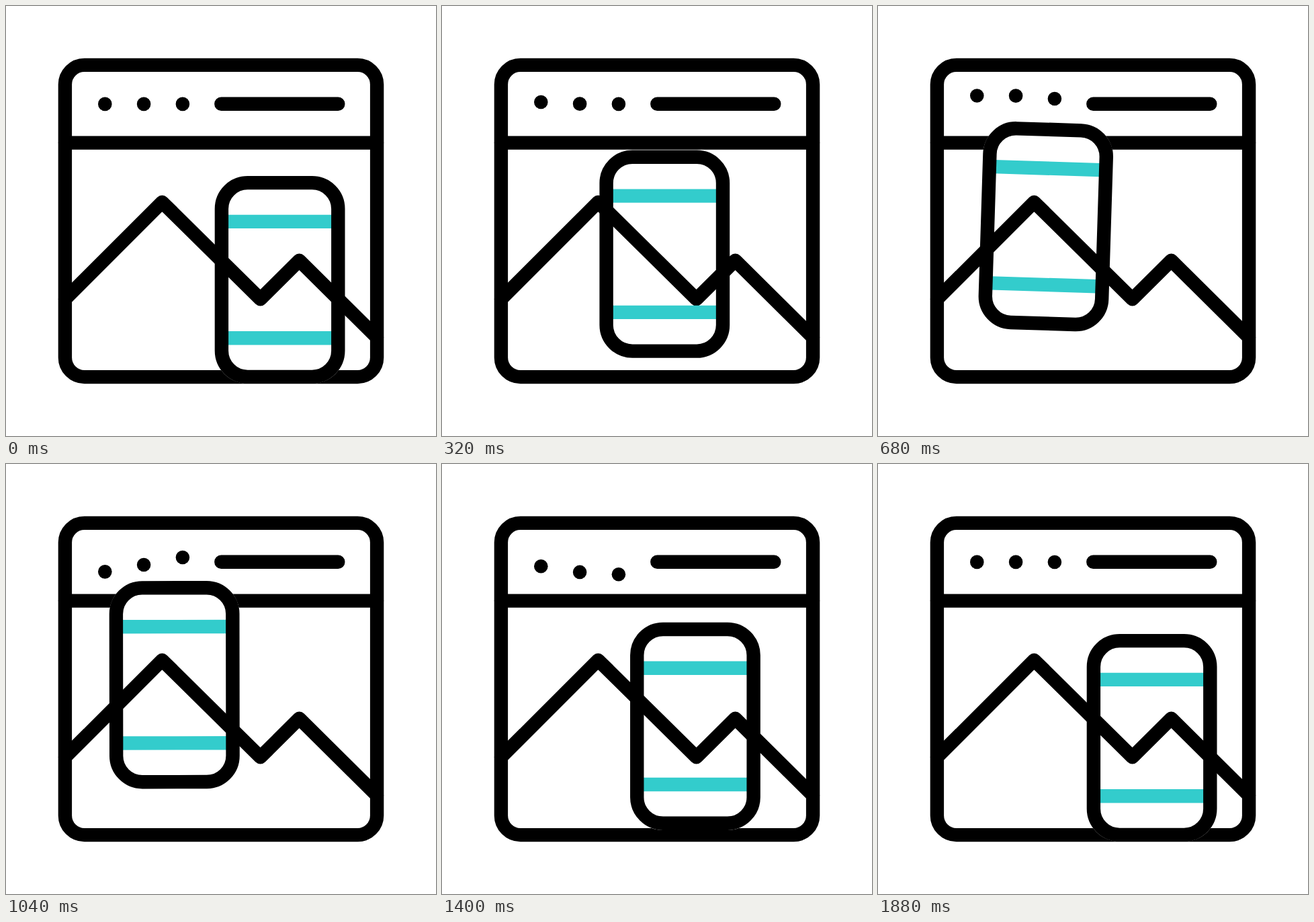
Write an HTML page that moves like this. It is 640 by 640 pixels and loops after 1.92 s.

```html
<!DOCTYPE html>
<html lang="en">
<head>
<meta charset="utf-8">
<title>Responsive window</title>
<style>
  html, body { margin: 0; width: 100%; height: 100%; overflow: hidden; background: #fff; }
  svg { display: block; width: 100%; height: 100%; }
  .line { fill: none; stroke: #000; stroke-width: 20.4; stroke-linecap: round; stroke-linejoin: round; }
  .stripe { stroke: #33cccc; stroke-width: 20.4; }
</style>
</head>
<body>
<svg viewBox="0 0 640 640">
  <rect class="line" x="87.9" y="87.9" width="464.2" height="464.2" rx="28.9"/>
  <path class="line" d="M88 203.6H552M320.3 145.8H494.3"/>
  <g id="dots">
    <circle cx="147.3" r="10.3"/>
    <circle cx="205.1" r="10.3"/>
    <circle cx="262.9" r="10.3"/>
  </g>
  <g class="phone">
    <rect x="-96.9" y="-154.6" width="193.8" height="309.2" rx="49" fill="#fff"/>
  </g>
  <path class="line" d="M88 436.3L232.4 291.9L378.6 436.3L436.5 378.8L552 493.2"/>
  <g class="phone">
    <path class="stripe" d="M-86.7 -86.6H86.7M-86.7 86.7H86.7"/>
    <rect class="line" x="-86.7" y="-144.4" width="173.4" height="288.8" rx="38.8"/>
  </g>
</svg>
<script>
  const LOOP = 1920, STEP = 40, TICK = 32;
  const HOME = [407.6, 407.5], AWAY = [250.7, 328.7];
  const dots = [...document.querySelectorAll('#dots circle')];
  const phones = document.querySelectorAll('.phone');

  const smooth = u => u * u * (3 - 2 * u);

  // Bezier timing with flat ends: handles at (x1, 0) and (x2, 1).
  function ease(x, x1, x2) {
    let lo = 0, hi = 1;
    for (let i = 0; i < 24; i++) {
      const u = (lo + hi) / 2, v = 1 - u;
      if (3 * v * v * u * x1 + 3 * v * u * u * x2 + u * u * u < x) lo = u; else hi = u;
    }
    return smooth(lo);
  }

  // Keys: [tick, value, x1, x2], the handles shape the way to the next key.
  function track(keys, k) {
    if (k <= keys[0][0]) return keys[0][1];
    for (let i = 1; i < keys.length; i++) {
      const [a, from, x1 = 1 / 3, x2 = 2 / 3] = keys[i - 1], [b, to] = keys[i];
      if (k < b) return from + (to - from) * ease((k - a) / (b - a), x1, x2);
    }
    return keys[keys.length - 1][1];
  }

  const BOUNCE = [[4, 145.9, 0.55, 0.51], [20, 133], [36, 164.2, 0.36, 0.37], [52, 145.9]];
  const TRIP = [[2, 0], [18.3, 1], [33, 1], [48, 0]];
  const TILT = [[18, 0], [23, 2.5], [28, -2.5], [33, 0]];
  const DOT_LAG = 4;

  function draw(ms) {
    const k = ms / TICK;
    dots.forEach((dot, i) => dot.setAttribute('cy', track(BOUNCE, k - i * DOT_LAG)));

    const p = track(TRIP, k), tilt = track(TILT, k);
    // The way back bows slightly upwards.
    const bow = k > 33 ? 14 * (1 - p) ** 2 * p : 0;
    const x = HOME[0] + (AWAY[0] - HOME[0]) * p - tilt * 0.5;
    const y = HOME[1] + (AWAY[1] - HOME[1]) * p - tilt * 0.3 - bow;
    phones.forEach(g => g.setAttribute('transform', `translate(${x} ${y}) rotate(${tilt})`));
  }

  const start = performance.now();
  function loop() {
    const ms = (performance.now() - start) % LOOP;
    draw(Math.floor(ms / STEP) * STEP);
    requestAnimationFrame(loop);
  }
  loop();
</script>
</body>
</html>
```
